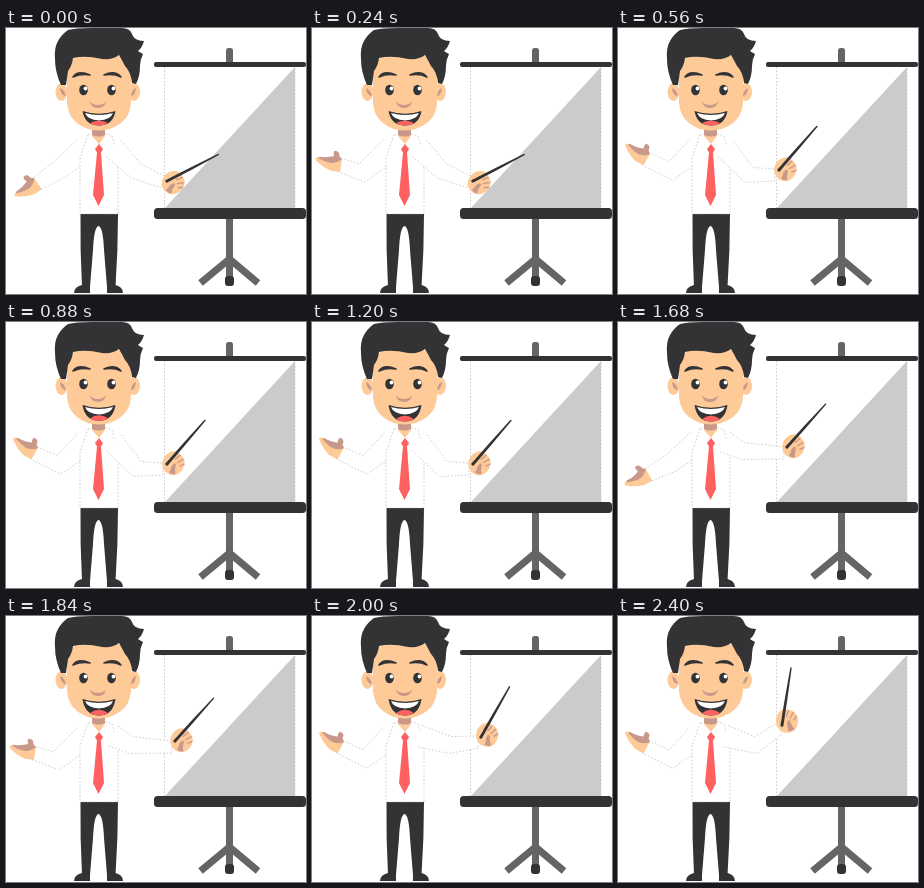
An HTML page that plays this animation: 300 px wide and 266 px high, repeating every 2.48 s.

```html
<!DOCTYPE html>
<html lang="en">
<head>
<meta charset="utf-8">
<title>Presenter</title>
<style>
  html, body { margin: 0; width: 100%; height: 100%; overflow: hidden; background: #fff; }
  svg { display: block; width: 100vw; height: 100vh; }
  .dark { fill: #333335; }
  .pole { fill: none; stroke: #656567; stroke-width: 7; }
  .skin { fill: #fdca98; }
  .shade { fill: #c8988b; }
  .red { fill: #ff6060; }
  .white { fill: #fff; }
  .cloth { fill: #fff; stroke: #b4b4b4; stroke-width: .7; stroke-dasharray: 1.5 2; stroke-linejoin: round; }
  .line { fill: none; stroke: #333335; stroke-linecap: round; }
  .crease { fill: none; stroke: #c8988b; stroke-width: 1.3; stroke-linecap: round; }
</style>
</head>
<body>
<svg viewBox="0 0 300 266" preserveAspectRatio="none">
  <g id="board">
    <rect x="220" y="20" width="7" height="16" rx="2.5" fill="#656567"/>
    <path class="cloth" d="M158.500 39V180H289V39"/>
    <path fill="#cbcbcb" d="M289 39V181H158z"/>
    <path class="pole" d="M223.500 190V250M223.500 231L194.500 255M223.500 231L252 255"/>
    <rect class="dark" x="148" y="34" width="152" height="5" rx="2"/>
    <rect class="dark" x="148" y="180" width="152" height="11" rx="3.500"/>
    <rect class="dark" x="219" y="248" width="9" height="10" rx="3"/>
  </g>

  <path class="dark" d="M74.500 186H112Q112 222 109.500 259H101L98 222Q97 199 92.500 198Q88 199 87 222L84 259H76Q74 222 74.500 186z"/>
  <path class="dark" d="M76 257H84V265H68Q68 259 76 257zM101 257H109.500Q117 259 117 265H101z"/>

  <path id="sleeveL" class="cloth"/>
  <g id="handL">
    <path class="skin" d="M1 -7L-4 -9L-7 -7Q-14 -4 -22 -5Q-27 -4 -24 -1Q-16 5 -8 7L1 7z"/>
    <path class="shade" d="M1 -6L-2 -9Q-2 -14 -7 -13.500Q-9 -12 -7 -8Q-14 -5 -21 -5.500Q-24 -4 -20 -3Q-12 0 -7 -1Q-3 -2 1 -6z"/>
  </g>

  <path class="cloth" d="M82 107Q88 105 93 105Q99 105 106 108L112 130V186H74V130z"/>
  <path class="skin" d="M86 98H99V109L93 117L86 109z"/>
  <path class="shade" d="M86 102H99V107Q93 110 86 107z"/>
  <path class="white" d="M86 108L93 116L88 121L82 110zM99 108L93 116L98 121L104 110z"/>
  <path class="red" d="M93 116L97 121L95 124.500L98 167L92.500 178L87 167L91 124.500L89 121z"/>

  <path id="sleeveR" class="cloth"/>
  <g id="handR">
    <path class="skin" d="M-7 3Q-5 -4 1 -6Q7 -8 12 -5Q17 -2 16 5Q16 11 10 14Q4 17 -2 14Q-7 11 -7 3z"/>
    <path class="shade" d="M-5 7Q-2 7 1 5L5 5Q7 7 3 8.500Q0 10 -2 13Q-5 11 -5 7z"/>
    <path class="crease" d="M9 3L15 4M8 7L14 9M7 11L11 13"/>
    <path class="dark" d="M-1 -1.500Q-2.500 0 -1 1.500L26 1.300L58 .7Q59 0 58 -.7L26 -1.300z"/>
    <path class="skin" d="M2 -5Q6 -7 8 -4Q8 -1.500 5 -1.500Q2 -1.500 2 -5z"/>
  </g>

  <g id="head">
    <ellipse class="skin" cx="55.500" cy="64" rx="6" ry="9"/>
    <ellipse class="skin" cx="128" cy="64" rx="6" ry="9"/>
    <path class="shade" d="M54 60Q58 61 60 68Q55 68 54 60zM130 60Q126 61 125 68Q129 68 130 60z"/>
    <path class="skin" d="M61 40Q63 26 92 25Q123 26 125 40V75Q124 88 115 95Q105 102.500 93 102.500Q80 102.500 71 95Q62 88 61 75z"/>
    <path class="dark" d="M55 57Q49 44 49 31Q48 20 52 13Q56 6 62 2Q69 0 86 0H116Q124 0 126 6Q128 13 138 13Q136 20 132 23Q135 25 137 26Q134 32 134 38Q134 48 130 56L126 55Q125 44 119 38Q116 32 113 27Q107 32 96 31Q79 27 67 30Q66 38 62 43Q61 50 60 57z"/>
    <path class="dark" d="M67 49Q72 42 84 47Q75 45.500 67 49zM98 47Q109 42 115 49Q108 45.500 98 47z" stroke="#333335" stroke-width="1.600" stroke-linejoin="round"/>
    <ellipse class="dark" cx="77.500" cy="62" rx="4.300" ry="5.300"/>
    <ellipse class="dark" cx="105.500" cy="62" rx="4.300" ry="5.300"/>
    <circle class="white" cx="79.500" cy="60.500" r="1.900"/>
    <circle class="white" cx="107.500" cy="60.500" r="1.900"/>
    <path class="shade" d="M84 73Q86 77 92 77Q98 77 100 73Q99 80 92 80Q85 80 84 73z"/>
    <path id="mouth" class="dark"/>
    <path class="white" d="M79 85Q93 89 107 85Q104.500 92 93 92.500Q81.500 92 79 85z"/>
    <path id="tongue" class="red"/>
  </g>
</svg>
<script>
const LOOP = 2480, STEP = 80;
const $ = id => document.getElementById(id);

// Each row: time, wrist x, y, hand angle, elbow x, y
const leftLow = [31, 156, -34, 54, 141];
const leftMid = [28, 137, 8, 50, 145];
const leftUp = [28, 131, 29, 53, 143];
const left = [
  [0, ...leftLow], [240, ...leftMid], [400, ...leftUp], [1280, ...leftUp],
  [1520, 37, 163, -45, 57, 145], [1600, ...leftLow], [1680, 30, 153, -29, 53, 141],
  [1840, ...leftMid], [2000, ...leftUp]
];

// Each row: time, grip x, y, pointer angle, elbow x, y, wrist x, y
const rightLow = [161, 153, -27.4, 130, 143, 157, 154];
const rightMid = [161, 142, -49, 131, 147, 157, 147];
const rightHigh = [169, 125, -48, 125, 129, 166, 131];
const right = [
  [0, ...rightLow], [240, ...rightLow], [560, ...rightMid], [1280, ...rightMid],
  [1680, ...rightHigh], [1840, ...rightHigh],
  [2000, 169, 121, -60.4, 138, 129, 166, 126],
  [2240, 164, 109, -81, 138, 129, 161, 113]
];

const mouth = [[0, 0], [560, 0], [1120, 1]];

function pose(keys, t) {
  const i = keys.findIndex(k => k[0] > t);
  if (i < 0) return keys[keys.length - 1].slice(1);
  const a = keys[i - 1], b = keys[i];
  const u = (t - a[0]) / (b[0] - a[0]), e = u * u * (3 - 2 * u);
  return a.slice(1).map((v, j) => v + (b[j + 1] - v) * e);
}

// Tapered sleeve bending at the elbow
function sleeve(id, s, e, w, wide, cuff) {
  const off = (p, a, b, r) => {
    const dx = b[0] - a[0], dy = b[1] - a[1], k = r / Math.hypot(dx, dy);
    return [p[0] + dy * k, p[1] - dx * k].map(v => v.toFixed(2)).join(' ');
  };
  const mid = (wide + cuff) / 2;
  $(id).setAttribute('d',
    `M${off(s, s, e, wide)}L${off(e, s, w, mid)}L${off(w, e, w, cuff)}` +
    `L${off(w, e, w, -cuff)}L${off(e, s, w, -mid)}L${off(s, s, e, -wide)}`);
}

const place = (id, x, y, a) => $(id).setAttribute('transform', `translate(${x} ${y}) rotate(${a})`);

function draw(t) {
  const [lx, ly, la, lex, ley] = pose(left, t);
  sleeve('sleeveL', [80, 120], [lex, ley], [lx, ly], 12, 7);
  place('handL', lx, ly, la);

  const [gx, gy, ga, rex, rey, wx, wy] = pose(right, t);
  sleeve('sleeveR', [107, 120], [rex, rey], [wx, wy], 11, 6);
  place('handR', gx, gy, ga);

  const [m] = pose(mouth, t), low = 97.5 + 2 * m;
  $('mouth').setAttribute('d', `M76.500 83Q93 88.500 109.500 83Q107 ${low} 93 ${low}Q79 ${low} 76.500 83z`);
  $('tongue').setAttribute('d', `M84 ${low - 2.5}Q93 ${low - 7 - 2 * m} 102 ${low - 2.5}Q98 ${low} 93 ${low}Q88 ${low} 84 ${low - 2.5}z`);
}

function tick() {
  const t = performance.now() % LOOP;
  draw(Math.floor(t / STEP) * STEP);
  requestAnimationFrame(tick);
}
tick();
</script>
</body>
</html>
```
